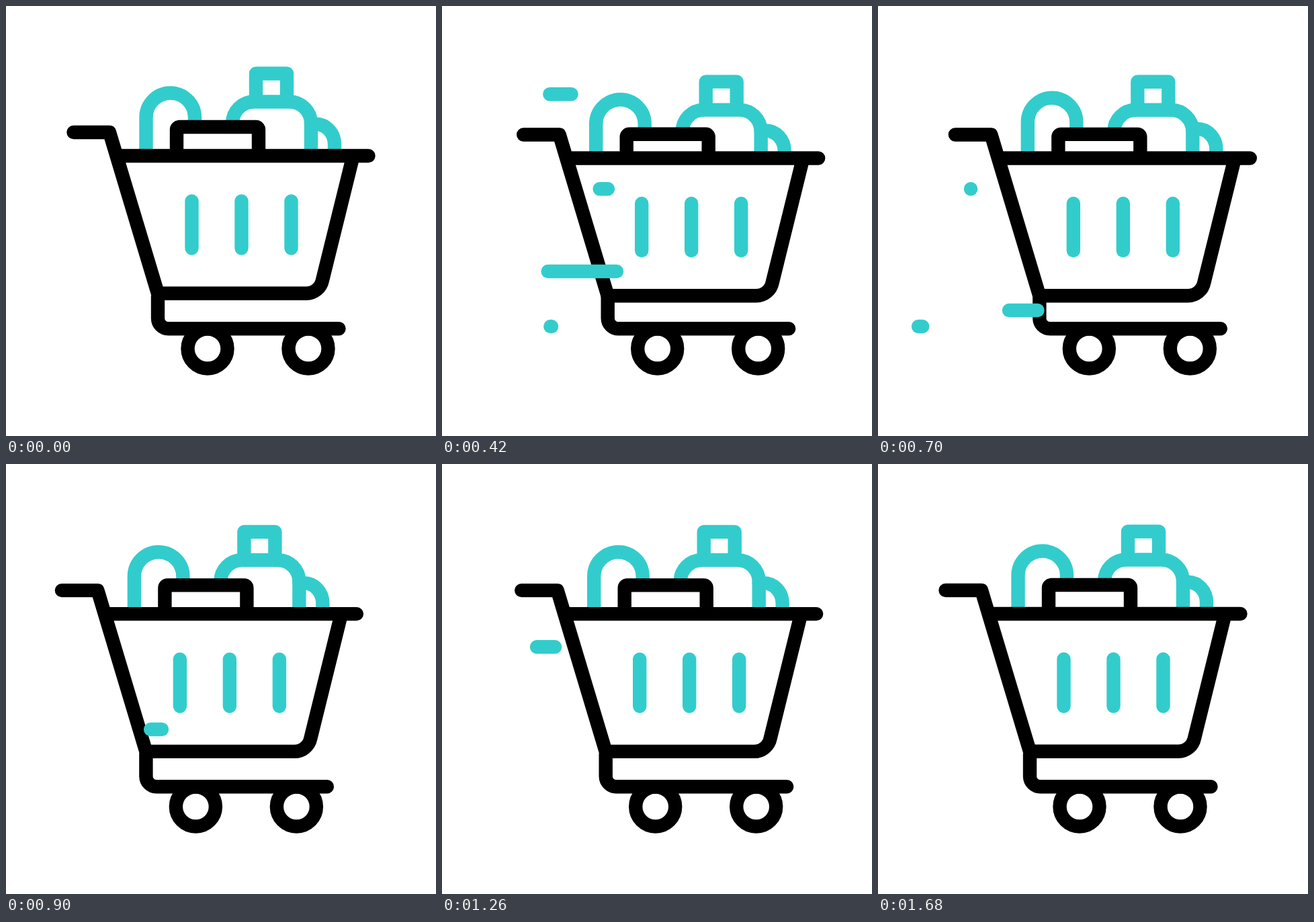
Recreate the animation shown at these times as an HTML page. Size 640 px wide and 640 px high, loop 2000 ms.

```html
<!DOCTYPE html>
<html lang="en">
<head>
<meta charset="utf-8">
<title>Shopping cart</title>
<style>
  html, body { margin: 0; height: 100%; overflow: hidden; background: #fff; }
  svg { display: block; width: 100vw; height: 100vh; }
  g { fill: none; stroke-width: 20.4; stroke-linecap: round; stroke-linejoin: round; }
  .ink { stroke: #000; }
  .teal { stroke: #3cc; }
</style>
</head>
<body>
<svg viewBox="0 0 640 640">
  <clipPath id="aboveRim"><path d="M0 0H640V225H0z"/></clipPath>
  <g id="cart">
    <g clip-path="url(#aboveRim)">
      <g class="teal">
        <path data-drop="10" data-delay="24" d="M208.5 260V165.75A36.25 36.25 0 0 1 281 165.75V180"/>
        <path data-drop="10" data-delay="24" d="M454 175.7H461A28 30 0 0 1 489 205.7V260"/>
        <path data-drop="14" d="M372 142.5V100.5H418V142.5M337 180V174.5A32 32 0 0 1 369 142.5H422A32 32 0 0 1 454 174.5V260"/>
      </g>
      <path class="ink" data-drop="12.4" style="fill:#fff" d="M254 260V184A4 4 0 0 1 258 180H372A4 4 0 0 1 376 184V260"/>
    </g>
    <g class="ink">
      <path d="M226 432V465A15.5 15.5 0 0 0 241.5 480.3H495.5"/>
      <circle cx="300" cy="510" r="29.5"/>
      <circle cx="450" cy="510" r="29.5"/>
    </g>
    <g data-drop="4">
      <path class="ink" d="M100.5 188H154L226 427.8H447A24.5 24.5 0 0 0 471 408L516.7 223M165 223H539.5"/>
      <path class="teal" d="M276.5 290.5V360.5M350.5 290.5V360.5M424.5 290.5V360.5"/>
    </g>
  </g>
  <g id="streaks" class="teal"></g>
</svg>
<script>
const LOOP = 2000, START = 200, SWAY = 360, BOUNCE = SWAY / 2;
const STREAK = 200, TAIL_LAG = 125;
const swayX = [0, 31, -18, 18, 0];

// Each speed line runs leftwards; its tail follows the head later.
const streaks = [
  { y: 131.3, from: 202, to: 159.7, start: 235 },
  { y: 395, from: 260, to: 49, start: 323 },
  { y: 272.3, from: 247, to: 138, start: 379 },
  { y: 477, from: 163, to: 60, start: 406 },
  { y: 453, from: 280, to: 195, start: 476 },
  { y: 395, from: 232, to: 35, start: 865 },
  { y: 272.3, from: 235, to: 141, start: 1007 }
];

const cart = document.getElementById('cart');
const movers = [...cart.querySelectorAll('[data-drop]')];
const clamp = (v, lo, hi) => Math.min(hi, Math.max(lo, v));
const ease = u => { u = clamp(u, 0, 1); return u * u * (3 - 2 * u); };
const shift = (el, x, y) => el.setAttribute('transform', `translate(${x} ${y})`);

function sway(t) {
  const p = clamp((t - START) / SWAY, 0, 4);
  const i = Math.min(3, Math.floor(p));
  return swayX[i] + (swayX[i + 1] - swayX[i]) * ease(p - i);
}

function bounce(t) {
  const p = clamp((t - START) / BOUNCE, 0, 8) % 2;
  return ease(1 - Math.abs(p - 1));
}

for (const s of streaks) {
  s.line = document.createElementNS('http://www.w3.org/2000/svg', 'path');
  document.getElementById('streaks').append(s.line);
}

function drawStreak({ y, from, to, start, line }, t) {
  const age = t - start;
  const at = a => from + (to - from) * ease(a / STREAK);
  const shown = age > 0 && age < STREAK + TAIL_LAG;
  line.setAttribute('d', shown ? `M${at(age)} ${y}H${at(age - TAIL_LAG) + 0.01}` : '');
}

function draw(t) {
  shift(cart, sway(t), 0);
  for (const el of movers) {
    const { drop, delay = 0 } = el.dataset;
    shift(el, 0, drop * bounce(t - delay));
  }
  for (const s of streaks) drawStreak(s, t);
}

const origin = performance.now();
function tick() {
  draw((performance.now() - origin) % LOOP);
  requestAnimationFrame(tick);
}
tick();
</script>
</body>
</html>
```
